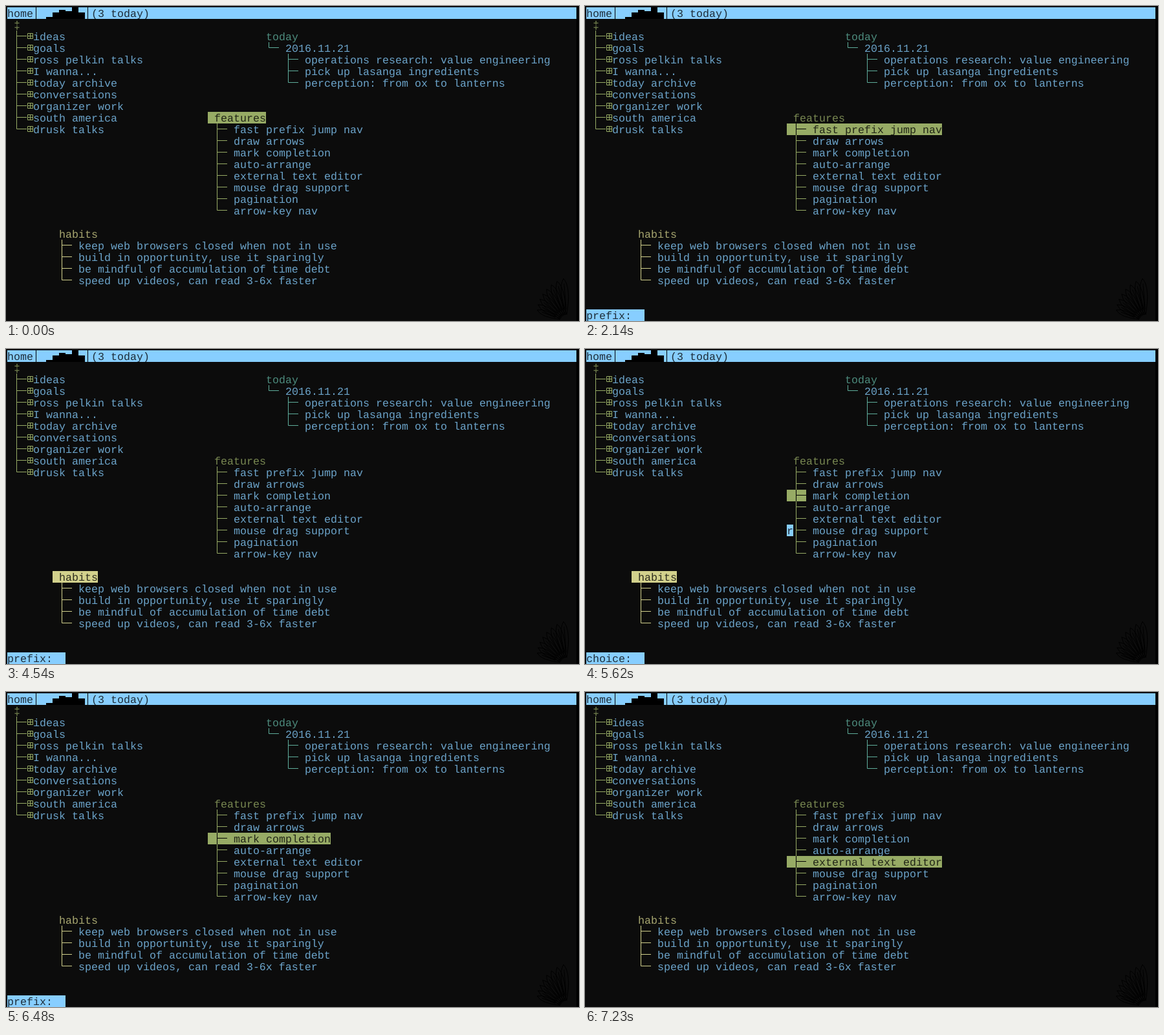
An HTML page that plays this animation: 886x488 px, repeating every 8 s.

```html
<!DOCTYPE html>
<html lang="en">
<head>
<meta charset="utf-8">
<title>Terminal outliner</title>
<style>
  html, body { margin: 0; width: 100%; height: 100%; overflow: hidden; background: #0c0c0c; }
  svg { display: block; }
  text {
    font: 16.664px "Liberation Mono", "Noto Sans Mono", monospace;
    font-variant-ligatures: none;
    text-rendering: geometricPrecision;
    white-space: pre;
    fill-opacity: .78;
  }
  path { fill: none; stroke-width: 1; }
</style>
</head>
<body>
<svg id="stage" width="886" height="488" viewBox="0 0 886 488"></svg>
<script>
const DARK = "#0c0c0c", BLACK = "#000";
const BLUE = "#87ceff", GREEN = "#97ab65", TEAL = "#5fae9c", SAND = "#d2d18c";
const LOOP = 8000;

// Character grid: 10 by 18 px cells, offset by 2 px.
const px = col => 2 + col * 10;
const py = row => 2 + row * 18;
const MID = 8.5;

const lists = [
  { col: 1, row: 1, title: "‡", color: GREEN, boxed: true, items: [
    "ideas", "goals", "ross pelkin talks", "I wanna...", "today archive",
    "conversations", "organizer work", "south america", "drusk talks"] },
  { col: 40, row: 2, title: "today", color: TEAL, items: ["2016.11.21"] },
  { col: 43, row: 3, color: TEAL, items: [
    "operations research: value engineering", "pick up lasanga ingredients",
    "perception: from ox to lanterns"] },
  { col: 32, row: 9, title: "features", color: GREEN, selectable: true, items: [
    "fast prefix jump nav", "draw arrows", "mark completion", "auto-arrange",
    "external text editor", "mouse drag support", "pagination", "arrow-key nav"] },
  { col: 8, row: 19, title: "habits", color: SAND, selectable: true, items: [
    "keep web browsers closed when not in use", "build in opportunity, use it sparingly",
    "be mindful of accumulation of time debt", "speed up videos, can read 3-6x faster"] }
];

// Selected row, prompt, hint letters by row, partly drawn selection row.
const steps = [
  { at: 0, row: 9 },
  { at: 500, row: 10 },
  { at: 2140, row: 10, prompt: "prefix:" },
  { at: 3450, row: 19 },
  { at: 4540, row: 19, prompt: "prefix:" },
  { at: 5000, row: 19, prompt: "choice:", hints: { 12: "a", 15: "r" } },
  { at: 5620, row: 19, prompt: "choice:", hints: { 15: "r" }, partial: 12 },
  { at: 5660, row: 12 },
  { at: 6480, row: 12, prompt: "prefix:" },
  { at: 7190, prompt: "prefix:" },
  { at: 7230, row: 14 }
];

const rect = (x, y, w, h, color) =>
  `<rect x="${x}" y="${y}" width="${w}" height="${h}" fill="${color}"/>`;
const fill = (col, row, cells, color) => rect(px(col), py(row), cells * 10, 18, color);
const label = (col, row, str, color) =>
  `<text x="${px(col)}" y="${py(row) + 15}" fill="${color}">${str}</text>`;
const stroke = (d, color) => `<path d="${d}" stroke="${color}"/>`;

function branch(col, row, last, color) {
  const x = px(col) + 4.5, y = py(row);
  return stroke(`M${x} ${y}v${last ? MID : 18}M${x} ${y + MID}h15.5`, color);
}

function plusBox(col, row, color) {
  const x = px(col) + 1.5, y = py(row) + MID - 4;
  return stroke(`M${x} ${y}h8v8h-8zM${x + 4} ${y}v8M${x} ${y + 4}h8`, color);
}

function drawList({ col, row, title, color, boxed, selectable, items }, step) {
  let out = "";
  if (title) {
    const on = selectable && step.row === row;
    if (on) out += fill(col - 1, row, title.length + 1, color);
    out += label(col, row, title, on ? BLACK : color);
  }
  items.forEach((item, i) => {
    const r = row + 1 + i;
    const on = selectable && step.row === r;
    const partial = selectable && step.partial === r;
    if (on) out += fill(col - 1, r, item.length + 4, color);
    if (partial) out += fill(col - 1, r, 3, color);
    out += branch(col, r, i === items.length - 1, on || partial ? BLACK : color);
    if (boxed) out += plusBox(col + 2, r, color);
    out += label(col + 3, r, item, on ? BLACK : BLUE);
  });
  return out;
}

function header() {
  const bars = [3, 10, 14, 12, 18, 10];
  return fill(0, 0, 88, BLUE) + label(0, 0, "home", BLACK) +
    stroke("M46.5 2v18M126.5 2v18", BLACK) +
    bars.map((h, i) => rect(px(6 + i), 20 - h, 10, h, BLACK)).join("") +
    label(13, 0, "(3 today)", BLACK);
}

// Faint fan of feathers behind the terminal.
function wing() {
  let d = "";
  for (let i = 0; i < 8; i++) {
    const angle = (-95 - i * 9) * Math.PI / 180;
    const at = (len, turn) => {
      const a = angle + turn;
      return `${(868 + len * Math.cos(a)).toFixed(1)} ${(490 + len * Math.sin(a)).toFixed(1)}`;
    };
    const len = 68 - i * 2.5;
    d += `M${at(12, 0)}Q${at(len * .8, -.2)} ${at(len, 0)}Q${at(len * .8, .2)} ${at(12, 0)}`;
    d += `M${at(20, 0)}L${at(len - 8, 0)}`;
  }
  return stroke(d, BLACK);
}

function draw(step) {
  let out = wing() + rect(882, 0, 4, 488, BLACK) + header();
  out += lists.map(list => drawList(list, step)).join("");
  for (const [row, key] of Object.entries(step.hints || {})) {
    out += fill(31, +row, 1, BLUE) + label(31, +row, key, BLACK);
  }
  if (step.prompt) out += fill(0, 26, 9, BLUE) + label(0, 26, step.prompt, BLACK);
  document.getElementById("stage").innerHTML = out;
}

let shown;
function tick() {
  const t = performance.now() % LOOP;
  const step = steps.filter(s => s.at <= t).pop();
  if (step !== shown) draw(shown = step);
  requestAnimationFrame(tick);
}
tick();
</script>
</body>
</html>
```
